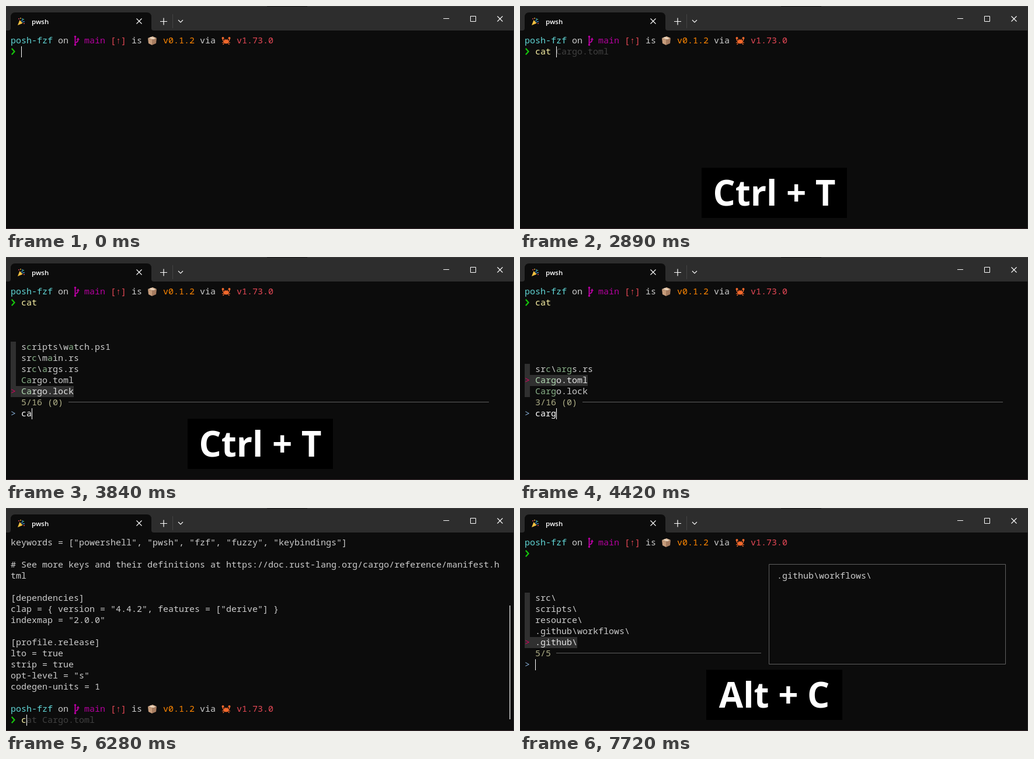
These frames come from a looping animation (870x382 px, 8000 ms). An HTML page with a canvas:

```html
<!DOCTYPE html>
<html lang="en">
<head>
<meta charset="utf-8">
<style>
  html, body { margin: 0; height: 100%; overflow: hidden; background: #0c0c0c; }
  canvas { display: block; }
</style>
</head>
<body>
<canvas width="870" height="382"></canvas>
<script>
const ctx = document.querySelector('canvas').getContext('2d');
const LOOP = 8000, CELL_W = 9, CELL_H = 19, LEFT = 8, TOP = 50;
const C = {
  bg: '#0c0c0c', bar: '#2d2d2d', fg: '#cccccc', cyan: '#61d6d6', purple: '#b4009e', red: '#e74856',
  orange: '#ff8700', green: '#16c60c', yellow: '#f9f1a5', ghost: '#404040', select: '#303030',
  match: '#87af87', matchOn: '#afd7af', bright: '#e4e4e4', pointer: '#d7005f', query: '#87afd7',
  info: '#afaf87', border: '#606060'
};

const files = ['.github\\workflows\\ci.yml', '.gitignore', 'Cargo.lock', 'Cargo.toml', 'LICENSE', 'README.md',
  'build.rs', 'resource\\demo.gif', 'resource\\init.ps1', 'resource\\icon.ico', 'scripts\\watch.ps1',
  'scripts\\bump.ps1', 'src\\args.rs', 'src\\main.rs', 'src\\init.rs', 'src\\config.rs'];
const folders = ['.github\\', '.github\\workflows\\', 'resource\\', 'scripts\\', 'src\\'];
const output = `license = "MIT"
keywords = ["powershell", "pwsh", "fzf", "fuzzy", "keybindings"]

# See more keys and their definitions at https://doc.rust-lang.org/cargo/reference/manifest.h
tml

[dependencies]
clap = { version = "4.4.2", features = ["derive"] }
indexmap = "2.0.0"

[profile.release]
lto = true
strip = true
opt-level = "s"
codegen-units = 1`.split('\n');

const colX = col => LEFT + col * CELL_W;
const rowY = row => TOP + row * CELL_H;

// Value of the latest [time, value] step that has begun.
const stepAt = (t, ...steps) => steps.filter(s => s[0] <= t).pop()[1];

function rect(x, y, w, h, color) {
  ctx.fillStyle = color;
  ctx.fillRect(x, y, w, h);
}

function shape(color, ...points) {
  ctx.fillStyle = color;
  ctx.beginPath();
  points.forEach(p => ctx.lineTo(...p));
  ctx.fill();
}

function stroke(path, color, width = 1) {
  ctx.strokeStyle = color;
  ctx.lineWidth = width;
  ctx.stroke(new Path2D(path));
}

function dot(x, y, r, color) {
  ctx.fillStyle = color;
  ctx.beginPath();
  ctx.arc(x, y, r, 0, 7);
  ctx.fill();
}

function put(col, row, text, color = C.fg) {
  ctx.font = '15px "Noto Sans Mono", "DejaVu Sans Mono", monospace';
  ctx.textAlign = 'left';
  ctx.fillStyle = color;
  ctx.fillText(text, colX(col), rowY(row) + 14);
}

const caret = (col, row) => rect(colX(col), rowY(row), 1, CELL_H, '#fff');

function drawPopper() {
  shape('#f5c242', [20, 33], [23.5, 24], [28.5, 29.5]);
  stroke('M26 26 q3 -1 2 -5 M28 28 q2 -2 4 -1', '#3f9be0', 1.2);
  [[22, 22, '#e8505b'], [25, 21, '#f5c242'], [30, 23, '#5cc05c'], [31, 30, '#e8505b']]
    .forEach(([x, y, color]) => dot(x, y, 0.9, color));
}

function drawWindow() {
  rect(0, 0, 870, 382, C.bg);
  rect(0, 0, 870, 42, C.bar);
  rect(0, 0, 870, 1, '#3c3c3c');
  rect(447, 0, 69, 1, '#1c1c1c');
  ctx.fillStyle = C.bg;
  ctx.fill(new Path2D('M4 42 Q8 42 8 38 V19 Q8 11 16 11 H241 Q249 11 249 19 V38 Q249 42 253 42 Z'));
  rect(869, 42, 1, 340, '#2a2a2a');
  rect(0, 381, 870, 1, '#3a2a30');
  drawPopper();
  ctx.font = '600 11.5px "Open Sans", sans-serif';
  ctx.textAlign = 'left';
  ctx.fillStyle = '#fff';
  ctx.fillText('pwsh', 44, 31);
  stroke('M223.5 21.5 l9 9 m0 -9 l-9 9', '#fff', 1.1);
  stroke('M264 26.5 h12 m-6 -6 v12', '#fff', 1.2);
  stroke('M285.5 14 v24', '#444');
  stroke('M295 24 l4 4 l4 -4', '#fff', 1.1);
  stroke('M749 21.5 h10 M795.5 17.5 h9 v9 h-9 z', '#fff');
  stroke('M841.5 17.5 l9 9 m0 -9 l-9 9', '#fff', 1.1);
}

function drawBranch(x, y) {
  stroke(`M${x + 2.5} ${y + 2} v15 m0 -4 q5 -1 5 -6`, C.purple, 2);
  shape(C.purple, [x + 4.5, y + 8], [x + 7.5, y + 4], [x + 10, y + 8]);
  dot(x + 2.5, y + 2.5, 1.8, C.purple);
  dot(x + 2.5, y + 16.5, 1.8, C.purple);
}

function drawPackage(x, y) {
  shape('#e0bd9c', [x + 1, y + 5], [x + 9, y + 2], [x + 16, y + 5], [x + 8, y + 8]);
  shape('#c69c7b', [x + 1, y + 5], [x + 8, y + 8], [x + 8, y + 17], [x + 2, y + 14]);
  shape('#a67c60', [x + 8, y + 8], [x + 16, y + 5], [x + 15, y + 14], [x + 8, y + 17]);
  shape('#efe0cf', [x + 4, y + 4], [x + 6, y + 3.2], [x + 13, y + 6.3], [x + 11, y + 7]);
}

function drawCrab(x, y) {
  const color = '#f4692c';
  ctx.fillStyle = color;
  ctx.beginPath();
  ctx.ellipse(x + 9, y + 11, 4.8, 3.6, 0, 0, 7);
  ctx.fill();
  stroke(`M${x + 4} ${y + 10} l-1 -4 M${x + 14} ${y + 10} l1 -4
    M${x + 5} ${y + 12} l-3 1 m3.5 1 l-2 2 M${x + 13} ${y + 12} l3 1 m-3.5 1 l2 2
    M${x + 7} ${y + 9} v-3 m4 3 v-3`, color, 1.3);
  dot(x + 3.5, y + 5, 2, color);
  dot(x + 14.5, y + 5, 2, color);
  dot(x + 7, y + 6.5, 0.8, '#301008');
  dot(x + 11, y + 6.5, 0.8, '#301008');
}

function drawStatus(row) {
  const y = rowY(row);
  put(0, row, 'posh-fzf', C.cyan);
  put(9, row, 'on');
  drawBranch(colX(12), y);
  put(14, row, 'main', C.purple);
  put(19, row, '[↑]', C.red);
  put(23, row, 'is');
  drawPackage(colX(26), y);
  put(29, row, 'v0.1.2', C.orange);
  put(36, row, 'via');
  drawCrab(colX(40), y);
  put(43, row, 'v1.73.0', C.red);
}

function drawPrompt(row, typed = '', cursorOn = false, hint = '') {
  const y = rowY(row), [command, ...args] = typed.split(' ');
  stroke(`M9.8 ${y + 3.8} l4.7 5.2 l-4.7 5.2`, C.green, 2.2);
  put(2, row, command, C.yellow);
  put(3 + command.length, row, args.join(' '));
  if (typed) put(2 + typed.length, row, hint.slice(typed.length), C.ghost);
  if (cursorOn) caret(2 + typed.length, row);
}

// Positions of the query letters in order, or null when one is missing.
function fuzzy(name, query) {
  const hits = [];
  for (const letter of query) {
    const i = name.toLowerCase().indexOf(letter, hits.length ? hits.at(-1) + 1 : 0);
    if (i < 0) return null;
    hits.push(i);
  }
  return hits;
}

function search(query) {
  const rank = name => name.length + (fuzzy(name, query)[0] ? 100 : 0);
  const found = files.filter(name => fuzzy(name, query));
  return query ? found.sort((a, b) => rank(a) - rank(b)) : found;
}

function drawFinder({ items, query = '', selected = 0, count, endX, cursorOn = true }) {
  const height = 8;
  items.slice(0, height).forEach((name, i) => {
    const row = 9 - i, y = rowY(row), on = i === selected, hits = fuzzy(name, query);
    rect(LEFT, y, on ? (name.length + 2) * CELL_W : CELL_W, CELL_H, C.select);
    if (on) put(0, row, '>', C.pointer);
    [...name].forEach((char, k) => put(2 + k, row, char,
      hits.includes(k) ? (on ? C.matchOn : C.match) : on ? C.bright : C.fg));
  });
  if (items.length > height) {
    const bar = Math.floor(height * height / items.length) * CELL_H;
    rect(831, rowY(10) - bar, 1, bar, C.border);
  }
  put(2, 10, count, C.info);
  const lineX = colX(count.length + 3);
  rect(lineX, 248, endX - lineX, 1, C.border);
  put(0, 11, '>', C.query);
  put(2, 11, query, '#fff');
  if (cursorOn) caret(2 + query.length, 11);
}

function drawKeys(text, x, width) {
  rect(x, 277, width, 86, '#000');
  ctx.font = '700 60px "Open Sans", sans-serif';
  ctx.textAlign = 'center';
  ctx.fillStyle = '#fff';
  ctx.fillText(text, x + width / 2, 342);
}

function fileScene(t) {
  drawStatus(0);
  if (t < 2990) {
    const typed = stepAt(t, [0, ''], [2220, 'c'], [2320, 'ca'], [2420, 'cat'], [2560, 'cat ']);
    const cursorOn = stepAt(t, [0, true], [300, false], [870, true], [1410, false], [1910, true]);
    drawPrompt(1, typed, cursorOn, 'cat Cargo.toml');
  } else if (t < 4750) {
    drawPrompt(1, 'cat ', t < 3030);
    if (t >= 3030) {
      const query = stepAt(t, [0, ''], [3700, 'c'], [3840, 'ca'], [3950, 'car'], [4090, 'carg']);
      const items = t < 3060 ? [] : search(query);
      drawFinder({
        items, query, endX: 827,
        selected: t < 4420 ? 0 : 1,
        count: `${items.length}/${t < 3060 ? 0 : files.length} (0)`,
        cursorOn: t < 3530 || t >= 3700
      });
    }
  } else {
    drawPrompt(1, 'cat Cargo.toml', t < 5320);
  }
  if (t >= 2890 && t < 3910) drawKeys('Ctrl + T', 311, 249);
}

function outputScene(t) {
  const shift = t < 5570 ? 0 : 1;
  output.slice(shift).forEach((text, row) => put(0, row, text));
  rect(862, 167, 2, 195, '#9f9f9f');
  if (t >= 5530) drawStatus(16 - shift);
  if (t < 5600) {
    caret(t >= 5530 && !shift ? 51 : 0, 16);
  } else {
    const typed = stepAt(t, [0, ''], [6240, 'c'], [6300, 'cl'], [6370, 'cle'], [6440, 'clea'], [6520, 'clear']);
    drawPrompt(16, typed, t < 6100 || t >= 6180, typed === 'c' ? 'cat Cargo.toml' : 'clear');
  }
}

function folderScene(t) {
  if (t < 6800) return caret(0, 0);
  drawStatus(0);
  if (t < 6840) return caret(51, 0);
  drawPrompt(1, '', t < 7560);
  if (t >= 7600) {
    const items = t < 7660 ? [] : folders;
    drawFinder({ items, count: `${items.length}/${items.length}`, endX: 413 });
    stroke('M426.5 96.5 H831.5 V267.5 H426.5 Z', C.border);
    if (t >= 7720) put(48, 3, folders[1]);
  }
  if (t >= 7480) drawKeys('Alt + C', 319, 233);
}

function frame(now) {
  const t = now % LOOP;
  drawWindow();
  (t < 5490 ? fileScene : t < 6760 ? outputScene : folderScene)(t);
  requestAnimationFrame(frame);
}
requestAnimationFrame(frame);
</script>
</body>
</html>
```
